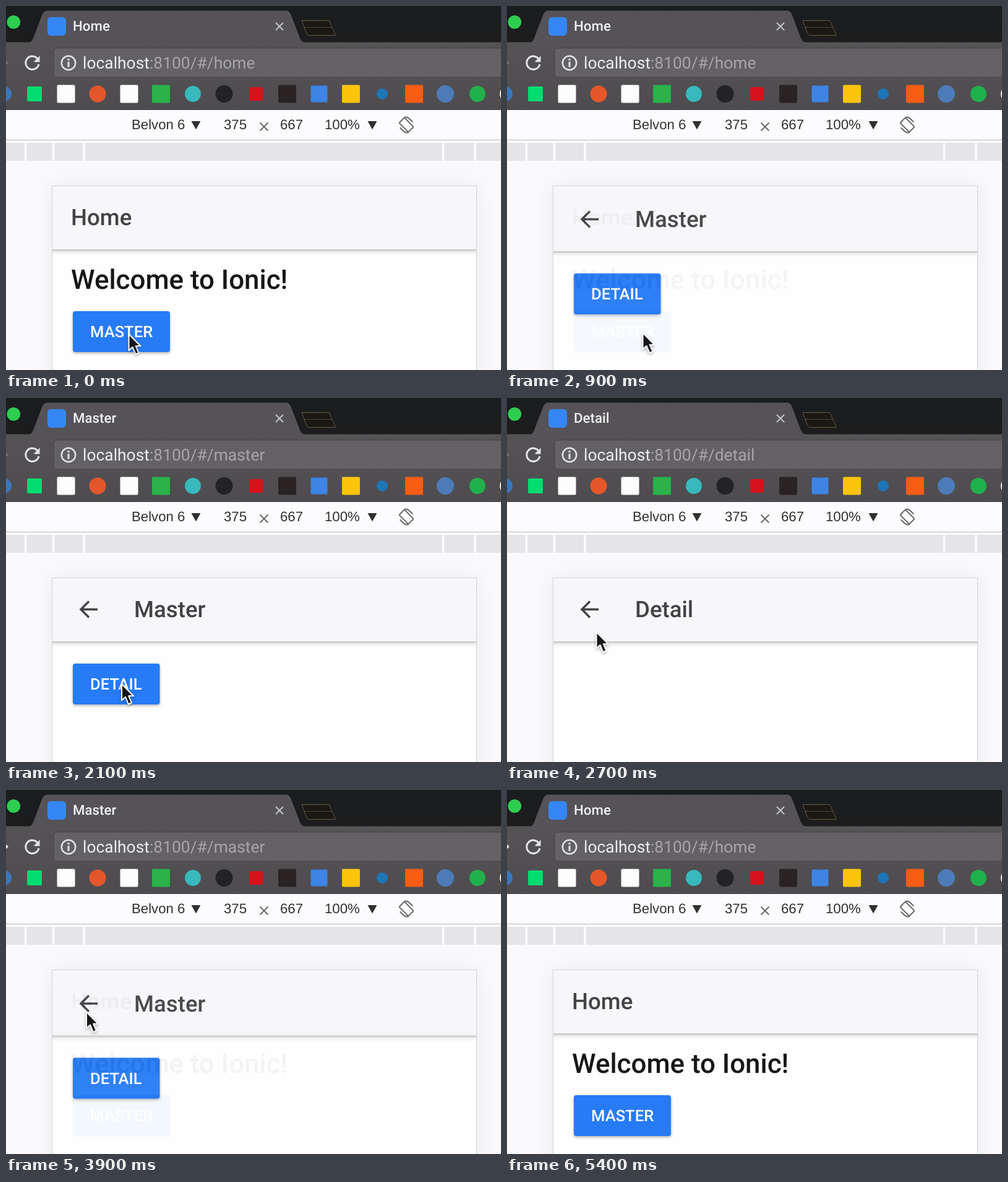
These frames come from a looping animation (800 px wide and 588 px high, 5.5 s). An HTML page:

```html
<!DOCTYPE html>
<html lang="en">
<head>
<meta charset="utf-8">
<title>Page transitions</title>
<style>
html, body { margin: 0; width: 100%; height: 100%; overflow: hidden; background: #faf9fc; }
svg { display: block; width: 800px; height: 588px; font-family: Roboto, sans-serif; text-rendering: geometricPrecision; }
.tools { font: 22.2px "Liberation Sans", Arial, sans-serif; fill: #303032; }
.title { font-size: 36.6px; font-weight: 500; fill: #434244; }
.lead { font-size: 43.8px; font-weight: 500; fill: #17171a; }
.label { font-size: 25.6px; font-weight: 500; fill: #fff; }
.button { fill: #277bf6; filter: drop-shadow(0 2px 2px rgba(0,0,0,.3)); }
.device { fill: #fefefe; stroke: #d3d8db; filter: drop-shadow(0 2px 16px rgba(0,0,0,.07)); }
.line { fill: none; stroke: #e4e3e5; stroke-width: 3; }
#tab { font-size: 22.3px; font-weight: 500; fill: #f1f0f2; }
#cursor { filter: drop-shadow(0 2px 2px rgba(0,0,0,.3)); }
</style>
</head>
<body>
<svg viewBox="0 0 800 588">
  <defs>
    <linearGradient id="strip" x2="0" y2="1">
      <stop stop-color="#1a1d20"/><stop offset="1" stop-color="#1c1c1d"/>
    </linearGradient>
    <linearGradient id="bar" x2="0" y2="1">
      <stop stop-color="#555356"/><stop offset="1" stop-color="#4e4c4f"/>
    </linearGradient>
    <linearGradient id="shade" x2="0" y2="1">
      <stop stop-color="#000" stop-opacity=".21"/>
      <stop offset=".22" stop-color="#000" stop-opacity=".17"/>
      <stop offset=".4" stop-color="#000" stop-opacity=".06"/>
      <stop offset="1" stop-color="#000" stop-opacity="0"/>
    </linearGradient>
    <clipPath id="screen"><path d="M75 291H760V588H75z"/></clipPath>
    <path id="back" d="M148 341.5H121M134 328.5L121 341.5L134 354.5" fill="none" stroke="#434244" stroke-width="3.5"/>
  </defs>

  <!-- browser chrome -->
  <path d="M0 0H800V60H0z" fill="url(#strip)"/>
  <path d="M0 58.5H800V168H0z" fill="url(#bar)"/>
  <path d="M38 59Q42 57 44 52L58.500 14Q61 7.500 66 7.500H453Q458 7.500 460.500 14L475 52Q477 57 481 59z" fill="#555356"/>
  <circle cx="12.300" cy="26" r="10.800" fill="#2fcd50"/>
  <rect x="67" y="18" width="30" height="30" rx="6" fill="#3587f5"/>
  <text id="tab" x="108" y="40"></text>
  <path d="M436 27l12 12m0-12l-12 12" class="line" style="stroke:#c3c2c4;stroke-width:2.2"/>
  <path d="M478 23.500H522L532.500 47.500H490Q487 47.500 485 43z" fill="#1a1815" stroke="#6b573f"/>
  <path d="M482 34.500H526" stroke="#55452f"/>

  <path id="forward" d="M-8 91.500H1M-5 85L1.800 91.500L-5 98" class="line"/>
  <path d="M51.500 86A10.700 10.700 0 1 0 53 94" class="line"/>
  <path d="M54.500 80.500V90.500H44.500z" fill="#e4e3e5"/>
  <rect x="77" y="68" width="740" height="47" rx="5" fill="#636164" stroke="#454346"/>
  <circle cx="101" cy="92" r="11.200" class="line" style="stroke-width:2.5"/>
  <path d="M101 90V98.500M101 85V88" class="line"/>
  <text x="124" y="101" font-size="26.4" fill="#eeedef">localhost<tspan id="url" fill="#a7a5a8"></tspan></text>
  <g id="marks"></g>

  <!-- device toolbar and ruler -->
  <path d="M0 168H800V216H0z" fill="#fcfbfd"/>
  <path d="M0 167.500H800" stroke="#454346"/>
  <path d="M0 216.500H800" stroke="#c9c8ca" stroke-width="1.500"/>
  <g class="tools">
    <text x="203" y="199">Belvon 6</text>
    <text x="352" y="199">375</text>
    <text x="443" y="199">667</text>
    <text x="515" y="199">100%</text>
    <path d="M299.500 186H314.500L307 199.500zM584.500 186H599.500L592 199.500z"/>
  </g>
  <path d="M410.500 188.500l13 13m0-13l-13 13" fill="none" stroke="#69686a" stroke-width="2"/>
  <g transform="translate(647 192) rotate(-45)" fill="none" stroke="#656466" stroke-width="2">
    <rect x="-6" y="-10.500" width="12" height="21" rx="1.500"/>
    <path d="M-10.500 -4V3Q-10.500 9 -6 11M10.500 4V-3Q10.500 -9 6 -11"/>
  </g>
  <path d="M0 221H800V250H0z" fill="#e5e4e6"/>
  <path d="M31.500 221V250M76.500 221V250M126 221V250M706.500 221V250M758 221V250" stroke="#fcfbfd" stroke-width="3.500"/>

  <!-- app -->
  <rect x="74.500" y="290.500" width="686" height="320" class="device"/>
  <g id="app" clip-path="url(#screen)"></g>
  <path d="M74.500 588V290.500H760.500V588" fill="none" stroke="#d3d8db"/>
  <g id="cursor">
    <path d="M0 0V26.500L6 21L10.800 32.500L16 30.300L11.200 19.200H19z" fill="#161618" stroke="#fff" stroke-width="2" stroke-linejoin="round"/>
  </g>
</svg>

<script>
const LOOP = 5500, TICK = 100, DROP = 80;
const EASE_IN = 'cubic-bezier(.47,0,.745,.715)';
const EASE_OUT = 'cubic-bezier(.36,.66,.04,1)';
const $ = id => document.getElementById(id);

// bookmark shapes: centre x, half size, colour, round?
const marks = [
  [-3, 12, '#3d77ba', 1], [46, 12, '#02dc70'], [97, 14.5, '#fdfdfd'], [148, 13.5, '#e4572a', 1],
  [199, 14.5, '#fdfdfd'], [250.5, 14.5, '#2bb24b'], [302, 13, '#38b9bd', 1], [352.5, 14, '#232224', 1],
  [404, 11, '#d5121b'], [454.5, 14.5, '#292423'], [506, 13.5, '#3f83e4'], [557.5, 14.5, '#fcc40a'],
  [608, 9, '#1d75b9', 1], [659.5, 14.5, '#f95d14'], [710, 14, '#4c7bb8', 1], [762, 13, '#20b14c', 1],
  [812, 14, '#eeeeef', 1]
];
$('marks').innerHTML = marks.map(([x, r, fill, round]) =>
  `<rect x="${x - r}" y="${142 - r}" width="${2 * r}" height="${2 * r}" rx="${round ? r : 2}" fill="${fill}"/>`
).join('');

const button = (text, y, w) =>
  `<rect class="button" x="108" y="${y}" width="${w}" height="66" rx="4"/>
   <text class="label" x="136" y="${y + 42}">${text}</text>`;

const page = (title, body, nested = true) =>
  `<g id="${title}"><path d="M75 290H760V700H75z" fill="#fefefe"/>${body}
   <path d="M75 290H760V393H75z" fill="#f7f6f9"/>
   <path d="M75 393H760V403H75z" fill="url(#shade)"/>
   ${nested ? '<use href="#back"/>' : ''}
   <text class="title" x="${nested ? 207 : 105}" y="354">${title}</text></g>`;

$('app').innerHTML =
  page('Home', '<text class="lead" x="105" y="457">Welcome to Ionic!</text>' + button('MASTER', 493, 157), false) +
  page('Master', button('DETAIL', 429, 140.5)) +
  page('Detail', '');

function animate(id, frames) {
  const a = $(id).animate(frames, { duration: LOOP, fill: 'both' });
  a.pause();
  return a;
}

// a page rises in at `enter` and drops away at `leave`
function visit(id, enter, leave) {
  const key = (t, shown, easing = 'linear') => ({
    offset: t / LOOP, opacity: shown, easing,
    transform: `translateY(${shown ? 0 : DROP}px)`
  });
  return animate(id, [
    key(0, 0), key(enter, 0, EASE_OUT), key(enter + 280, 1),
    key(leave, 1, EASE_IN), key(leave + 200, 0), key(LOOP, 0)
  ]);
}

// pointer stops: time, x, y
const stops = [
  [0, 198.5, 530], [700, 198.5, 530], [900, 219.5, 528], [1100, 219.5, 528], [1500, 187, 462],
  [2300, 187, 462], [2700, 144.5, 378], [3000, 130, 358.5], [4900, 130, 358.5],
  [5200, 330, -50], [LOOP, 330, -50]
];

const anims = [
  visit('Master', 740, 3860),
  visit('Detail', 2240, 3143),
  animate('cursor', stops.map(([t, x, y]) => ({
    offset: t / LOOP, transform: `translate(${x}px,${y}px)`, easing: 'ease-in-out'
  })))
];

const urls = [[0, 'home'], [1100, 'master'], [2600, 'detail'], [3500, 'master'], [4200, 'home']];
const tabs = [[0, 'Home'], [1300, 'Master'], [2700, 'Detail'], [3700, 'Master'], [4400, 'Home']];
const at = (list, t) => list.filter(([start]) => start <= t).pop()[1];

function draw(now) {
  const t = Math.floor(now % LOOP / TICK) * TICK;
  anims.forEach(a => { a.currentTime = t; });
  $('url').textContent = ':8100/#/' + at(urls, t);
  $('tab').textContent = at(tabs, t);
  $('forward').style.stroke = t < 3500 ? '#757376' : '#f0eff1';
}

const start = performance.now();
function loop() {
  draw(performance.now() - start);
  requestAnimationFrame(loop);
}
loop();
</script>
</body>
</html>
```
